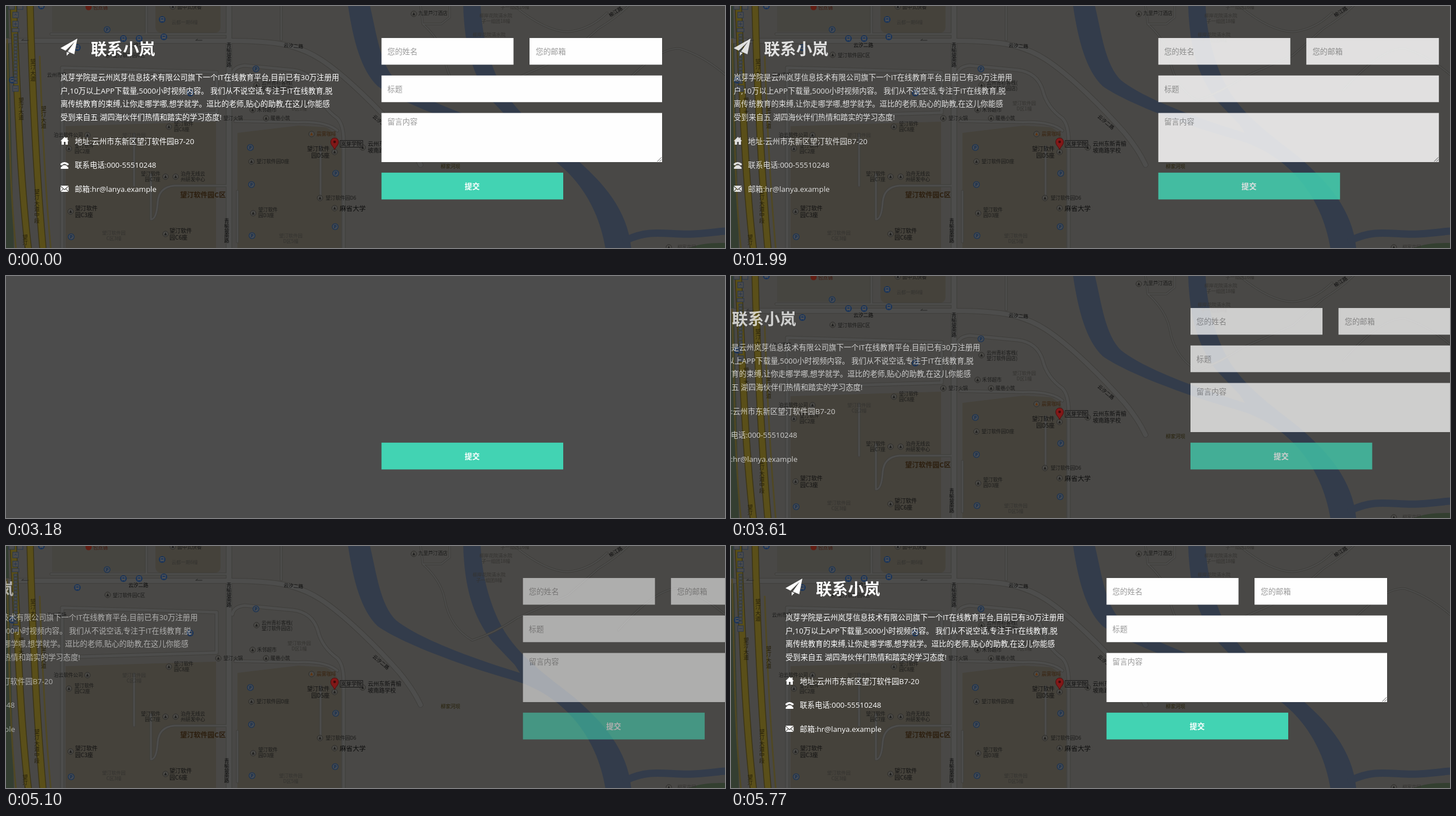
Write an HTML page that moves like this. It is 1280 by 431 pixels and loops after 6600 ms.

```html
<!DOCTYPE html>
<html lang="zh-CN">
<head>
<meta charset="utf-8">
<title>联系小岚</title>
<style>
  html, body { margin: 0; width: 100%; height: 100%; overflow: hidden; background: #4c4c4c; }
  svg { display: block; width: 100%; height: 100%; }
  text { font-family: "Open Sans", "Noto Sans CJK SC", "Noto Sans CJK", sans-serif; white-space: pre; }
  #labels text { font-family: "Noto Sans CJK SC", "Noto Sans CJK", sans-serif; }
  .line { fill: none; stroke-linejoin: round; stroke-linecap: round; }
  .copy { font-size: 13.34px; fill: #fff; }
  .hint { font-size: 13.4px; fill: #999; }
  .bold { font-weight: 700; fill: #fff; }
</style>
</head>
<body>
<svg viewBox="0 0 1280 431">
  <rect width="1280" height="431" fill="#4c4c4c"/>

  <g id="map">
    <rect width="1280" height="431" fill="#494846"/>
    <g fill="#45423b">
      <path d="M82 0H250V46H82Z" opacity=".5"/>
      <path d="M266 0H382V36Q382 48 370 48H278Q266 48 266 36Z"/>
      <path d="M106 214L374 206V431H106Z"/>
      <path d="M412 226L520 213L570 216Q597 232 597 262V431H412Z"/>
    </g>
    <path d="M0 0H4L14 431H0Z" fill="#343e31"/>
    <path d="M1215 431Q1240 421 1280 422V431Z" fill="#333f30"/>
    <g fill="#333c4b">
      <path d="M609 0C618 60 632 115 662 143C700 170 800 210 900 238C985 262 1050 330 1067 431H1113C1106 360 1060 312 1012 270C960 228 900 190 872 122C854 78 847 40 845 0H814C816 70 830 125 866 170L906 212L915 226C830 200 735 165 694 132C666 104 660 50 648 0Z"/>
      <path class="line" d="M1104 417C1150 395 1180 409 1225 406S1268 401 1284 401" style="stroke:#333c4b;stroke-width:13"/>
    </g>
    <g id="roads"></g>
    <g class="line">
      <path d="M13 0C20 140 24 300 40 435M43 0C46 130 54 300 66 435" stroke="#3c3517" stroke-width="13"/>
      <path d="M13 0C20 140 24 300 40 435M43 0C46 130 54 300 66 435" stroke="#5a4f19" stroke-width="10"/>
      <path d="M60 90C64 200 70 330 80 435M2 60C6 200 6 320 18 435" stroke="#504824" stroke-width="3"/>
      <path d="M338 61H349M338 61l3 -2M28 61H40M28 61l3 -2" stroke="#272725"/>
    </g>
    <g id="icons"></g>
    <g id="slider" fill="#4b4b4b" stroke="#26364f"></g>
    <circle cx="147" cy="2" r="5.5" fill="#611d13"/>
    <g id="labels"></g>
    <rect x="595" y="239.5" width="40" height="12" fill="#4a4947" stroke="#161616"/>
    <text x="615" y="249" font-size="9.4" text-anchor="middle" fill="#0d0d0d">岚芽学院</text>
    <path d="M585 256C583 250 578 248 578 242a7 7 0 0 1 14 0C592 248 587 250 585 256Z" fill="#821818" stroke="#4d0e0e"/>
    <circle cx="585" cy="242" r="2.3" fill="#3d0b0b"/>
  </g>

  <g id="info">
    <path fill="#fff" d="M127 58L97 75L106 79.5L122 64L110 81L121.500 86ZM108 82V88.500L113 83.500Z"/>
    <text class="bold" x="151" y="86.500" font-size="28.6">联系小岚</text>
    <g class="copy">
      <text x="97" y="131.700">岚芽学院是云州岚芽信息技术有限公司旗下一个IT在线教育平台,目前已有30万注册用</text>
      <text x="97" y="155.500">户,10万以上APP下载量,5000小时视频内容。 我们从不说空话,专注于IT在线教育,脱</text>
      <text x="97" y="179.300">离传统教育的束缚,让你走哪学哪,想学就学。逗比的老师,贴心的助教,在这儿你能感</text>
      <text x="97" y="203.100">受到来自五 湖四海伙伴们热情和踏实的学习态度!</text>
      <text x="122.500" y="245.700">地址:云州市东新区望汀软件园B7-20</text>
      <text x="122.500" y="288.400">联系电话:000-55510248</text>
      <text x="122.500" y="331.200">邮箱:hr@lanya.example</text>
    </g>
    <g fill="#fff">
      <path d="M104.500 233L97 240.500H99V247H103V242H106V247H110V240.500H112L109.500 238V234H107.500V236Z"/>
      <path d="M97 283V281Q104 275 111.500 281V283Q108 285 107 282Q104 280.500 101.500 282Q100.500 285 97 283ZM102 283.500H106.500L111 287.500V290H97.500V287.500Z"/>
      <path d="M97 320H111.500L104.200 326.500ZM97 321.500L101.500 325.500L97 330ZM111.500 321.500V330L107 325.500ZM102.200 326.200L104.200 328L106.300 326.200L111 331H97.500Z"/>
    </g>
  </g>

  <g id="form">
    <g id="fields">
      <path fill="#fefefe" d="M668.500 57H903.500V104.500H668.500ZM932 57H1168V104.500H932ZM668.500 123.800H1168V171.200H668.500ZM668.500 190.400H1168V278H668.500Z"/>
      <g class="hint">
        <text x="679" y="86">您的姓名</text>
        <text x="943" y="86">您的邮箱</text>
        <text x="679" y="152.700">标题</text>
        <text x="679" y="211">留言内容</text>
      </g>
      <path d="M1159.500 277L1167 269.500M1163.500 277L1167 273.500" stroke="#555"/>
    </g>
    <rect x="668.500" y="296.800" width="323.500" height="47.700" fill="#42d3b3"/>
    <text class="bold" x="830" y="326" font-size="13.4" text-anchor="middle">提交</text>
  </g>
</svg>

<script>
const $ = id => document.getElementById(id);
const NS = 'http://www.w3.org/2000/svg';

function add(parent, tag, attrs, content) {
  const el = document.createElementNS(NS, tag);
  for (const k in attrs) el.setAttribute(k, attrs[k]);
  if (content) el.textContent = content;
  parent.append(el);
  return el;
}

// Roads: darker casing first, then the surface.
const roads = [
  [9, 'M397 -5V435'],
  [8, 'M0 62H395C470 62 515 66 560 95S665 185 700 225Q725 255 738 283'],
  [5, 'M100 110L375 118V190L100 198V431M100 110V198'],
  [5, 'M403 122Q405 108 425 106L510 114Q545 118 555 150Q562 180 590 200Q601 212 601 240V431'],
  [4, 'M408 205L520 207Q570 205 590 222'],
  [3, 'M228 228V320M258 380V300M395 320H300Q272 322 270 350Q268 380 258 380'],
  [3, 'M412 330V420M560 250V340M250 0V48M395 50H80M490 0V60'],
  [2, 'M738 0L742 32Q775 62 781 95Q790 145 830 168Q870 155 910 128L1000 88L1055 40Q1085 22 1110 -2'],
  [2, 'M742 32H775L790 20V0M905 0Q960 45 1000 46Q1040 42 1070 12M1090 150Q1160 72 1200 76Q1240 88 1280 122']
];
for (const [extra, color] of [[2, '#3f3e3b'], [0, '#4d4d4c']])
  for (const [w, d] of roads)
    add($('roads'), 'path', { class: 'line', d, stroke: color, 'stroke-width': w + extra });

// Map markers
function marker(kind, x, y) {
  const g = add($('icons'), 'g', { transform: `translate(${x} ${y})` });
  if (kind === 'park') {
    add(g, 'circle', { r: 5.3, fill: '#454a52', stroke: '#1c3453', 'stroke-width': 1.3 });
    add(g, 'text', { y: 3, 'font-size': 8, 'font-weight': 700, 'text-anchor': 'middle', fill: '#17304f' }, 'P');
  } else if (kind === 'bus') {
    add(g, 'circle', { r: 6, fill: '#19345a' });
    add(g, 'path', { d: 'M-3 -3.500H3V2.500H-3ZM-2 2.500V4M2 2.500V4', fill: '#4a4d52', stroke: '#4a4d52' });
    add(g, 'path', { d: 'M-2 -2H2V0H-2Z', fill: '#19345a' });
  } else {
    add(g, 'circle', { r: 5, fill: '#4a4946', stroke: '#2d2c2a' });
    add(g, 'path', { d: 'M0 -3L2.500 2.500H-2.500Z', fill: kind === 'cafe' ? '#613510' : '#20201f' });
  }
}
const markers = {
  park: '180,42 445,112 435,252 587,298 437,318 116,411 438,409 586,393',
  bus: '63,0 278,24 281,55 209,58 237,58 127,74 328,155 11,132',
  spot: '726,14 181,87 446,141 378,200 290,215 145,230 112,254 437,277 284,304 302,304 585,260 635,252 440,369 115,366 284,406 559,342 585,360 463,200 439,185 297,1 1180,430',
  cafe: '544,228'
};
for (const kind in markers)
  for (const spot of markers[kind].split(' ')) marker(kind, ...spot.split(','));

// Zoom control
const box = (x, y, w, h) => add($('slider'), 'rect', { x, y, width: w, height: h });
box(5, -5, 10, 11);
box(20, -5, 10, 11);
box(12, 11, 10, 10);
box(12, 27, 10, 10);
for (let y = 50; y < 138; y += 6) box(14, y, 6, 4);
box(11, 40, 12, 6);
box(12, 142, 10, 10);
add($('slider'), 'path', { d: 'M14 32H20M17 29V35M14 147H20M15 17L17 14L19 17' });

// Place names; "|" breaks a line.
function label(x, y, text, { size = 8.7, fill = '#1b1b1a', anchor = 'start', turn = 0, weight = 400, gap = 1.15 } = {}) {
  text.split('|').forEach((line, i) => add($('labels'), 'text', {
    x, y: y + i * size * gap, 'font-size': size, fill, 'text-anchor': anchor, 'font-weight': weight,
    transform: `rotate(${turn} ${x} ${y})`
  }, line));
}
const group = (style, items) => items.forEach(([x, y, text]) => label(x, y, text, style));

group({}, [
  [190, 91, '望汀软件园C区'], [387, 203, '望汀火锅'], [447, 188, '禾邻超市'], [471, 203, '暖巷小筑'],
  [455, 140, '云州青衫客栈(|望汀软件园店)'], [299, 213, '望汀软件|园C8座'], [85, 233, '泊云软件公司'],
  [122, 252, '望汀软件|园C2座'], [311, 302, '泊舟无线云|州研发中心'], [446, 280, '望汀软件园D座'],
  [449, 366, '望汀软件|园D3座'], [569, 345, '望汀软件园D6'], [734, 16, '九里芦汀酒店'],
  [305, 5, '面中式快餐'], [73, 126, '云州市场']
]);
group({ size: 10, fill: '#111' }, [
  [644, 249, '云州东新青榆|坡南路学校'], [123, 364, '望汀软件|园C3座'], [291, 404, '望汀软件|园C6座']
]);
label(576, 258, '望汀软件|园D5座', { size: 10, fill: '#111', anchor: 'end' });
label(275, 302, '望汀软件|园C7座', { anchor: 'end' });
group({ size: 8.4, fill: '#343330', anchor: 'middle' }, [
  [522, 176, '望汀软件园|D区1幢'], [228, 233, '望汀软件园|C区2幢'], [192, 407, '望汀软件园|C区3幢'],
  [507, 412, '望汀软件园|D区5幢'], [872, 20, '柳岸花院清水院|子一组团18幢'],
  [860, 54, '柳岸花院清水院|子一组团8幢'], [906, 5, '子一组团16幢'], [318, 32, '云都一期6幢'],
  [1212, 432, '柳家花园']
]);
label(310, 341, '望汀软件园C区', { size: 12.2, fill: '#2c1e0e', weight: 700 });
label(594, 365, '麻省大学', { size: 11.6, fill: '#0e0e0e' });
label(553, 231, '晨雾咖啡', { fill: '#3a2410' });
label(774, 289, '柳家河坝', { fill: '#262008' });
label(155, 6, '包点铺', { fill: '#40180f' });

const road = { size: 8.8, fill: '#0c0c0c' };
label(218, 73, '云汐二路', road);
label(494, 73, '云汐二路', { ...road, turn: 4 });
label(652, 198, '云汐二路', { ...road, turn: 40 });
label(1076, 20, '榆江路', { ...road, turn: -33 });

const down = (x, y, text, style) => label(x, y, [...text].join('|'), { anchor: 'middle', ...style });
down(397, 73, '青榆坡南路', { ...road, gap: 1 });
down(393, 386, '青榆坡南路', { ...road, gap: 1 });
const avenue = { size: 9.6, fill: '#251f0a', gap: 1.08 };
down(48, 102, '望汀大道', avenue);
down(27, 171, '望汀大道', avenue);
down(67, 186, '望汀大道', avenue);
down(55, 334, '望汀大道中段', avenue);
down(34, 415, '望汀大道', avenue);

// Timeline: the picture holds between these moments.
const LOOP = 6600, SLIDE = 1000, WIDTH = 571;
const steps = [0, 1460, 1600, 1720, 1870, 1990, 2110, 2230, 2380, 2500,
  3180, 3330, 3460, 3610, 3730, 3850, 3970, 4090, 4240,
  4830, 4960, 5100, 5230, 5380, 5500, 5630, 5770];
const reloads = [{ blank: 1460, start: 1451 }, { blank: 3180, start: 3168 }, { blank: 4830, start: 4776 }];

// cubic-bezier(.25, .1, .25, 1)
function ease(x) {
  if (x <= 0 || x >= 1) return x <= 0 ? 0 : 1;
  const curve = (s, a, b) => 3 * s * (1 - s) ** 2 * a + 3 * s * s * (1 - s) * b + s ** 3;
  let lo = 0, hi = 1;
  for (let i = 0; i < 24; i++) {
    const mid = (lo + hi) / 2;
    if (curve(mid, .25, .25) < x) lo = mid; else hi = mid;
  }
  return curve(lo, .1, 1);
}

const show = (id, on) => $(id).setAttribute('visibility', on ? 'visible' : 'hidden');

function draw(ms) {
  const t = steps.findLast(s => s <= ms);
  const run = reloads.findLast(r => r.blank <= t);
  const blank = !!run && run.blank === t;
  const p = !run || blank ? 1 : ease((t - run.start) / SLIDE);
  const shift = WIDTH * (1 - p);
  for (const id of ['map', 'info', 'fields']) show(id, !blank);
  for (const [id, side] of [['info', -1], ['form', 1]]) {
    $(id).setAttribute('transform', `translate(${side * shift} 0)`);
    $(id).setAttribute('opacity', p);
  }
}

const begin = performance.now();
function tick() {
  draw((performance.now() - begin) % LOOP);
  requestAnimationFrame(tick);
}
tick();
</script>
</body>
</html>
```
